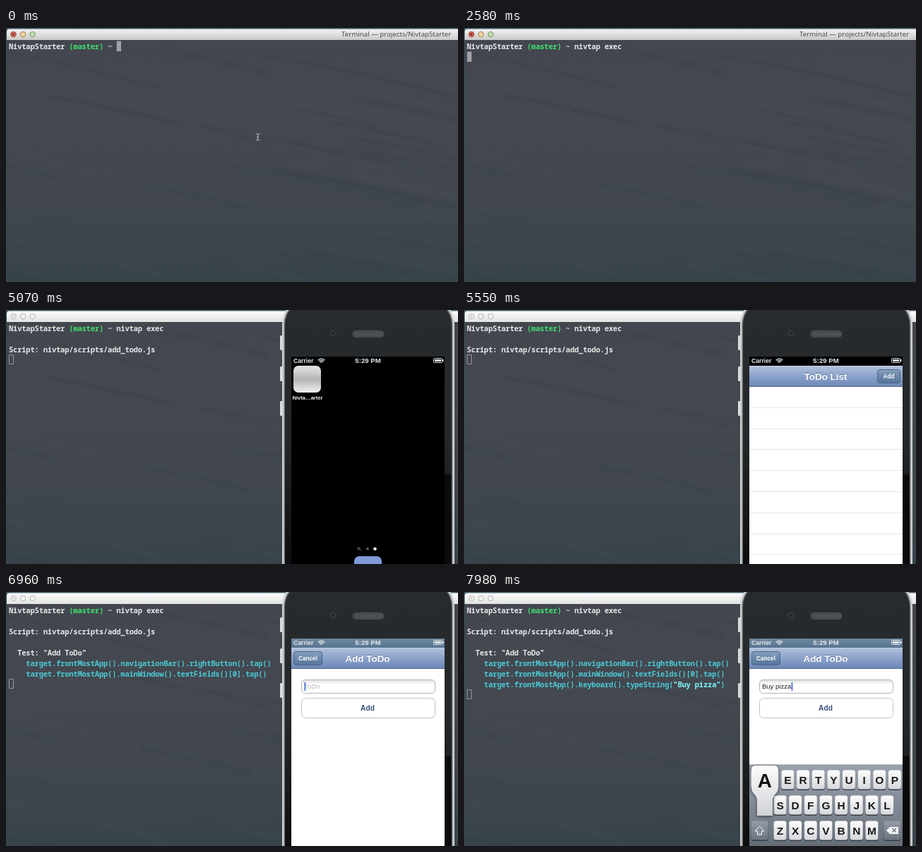
Recreate the animation shown at these times as an HTML page with a canvas. Size 640x360 px, loop 8000 ms.

```html
<!DOCTYPE html>
<html lang="en">
<head>
<meta charset="utf-8">
<title>Scripted phone test</title>
<style>
html, body { margin: 0; width: 100%; height: 100%; overflow: hidden; background: #42464d; }
canvas { display: block; width: 640px; height: 360px; }
</style>
</head>
<body>
<canvas id="stage" width="640" height="360"></canvas>
<script>
const c = document.getElementById('stage').getContext('2d');
const LOOP = 8000;
const SANS = '"Liberation Sans", Arial, sans-serif';
const MONO = '"Noto Sans Mono", "DejaVu Sans Mono", monospace';
const WHITE = '#e6e8e8', GREEN = '#42e070', CYAN = '#4cc9d4';
const COL = 6.09, ROW = 15;
const LEFT = 404, RIGHT = 621, TOP = 66, MID = 512, NAV = 79, BOTTOM = 391;

const PROJECT = 'NivtapStarter';
const COMMAND = 'nivtap exec';
const KEY_TIMES = [540, 780, 1050, 1200, 1320, 1440, 1590, 1740, 1890, 2040, 2190];
const TYPED = 'Buy pizza';
const TYPE_START = 7460, TYPE_STEP = 58;
const KEY_ROWS = ['QWERTYUIOP', 'ASDFGHJKL', 'ZXCVBNM'];

const at = {
  enter: 2520, script: 2790, phone: 3180, home: 3600, hideMouse: 4500,
  launch: 5070, launched: 5400, tint: 5600, tinted: 5800,
  test: 5910, tapAdd: 6090, tapField: 6390, slide: 6337, slid: 6697,
  focus: 6870, keys: 7060, keysUp: 7320, typeLine: 7320
};

const progress = (t, a, b) => Math.min(1, Math.max(0, (t - a) / (b - a)));
const ease = p => (1 - Math.cos(Math.PI * p)) / 2;

function text(s, x, y, font, color, align = 'left') {
  c.font = font;
  c.fillStyle = color;
  c.textAlign = align;
  c.fillText(s, x, y);
}

function gradient(y0, y1, ...colors) {
  const g = c.createLinearGradient(0, y0, 0, y1);
  colors.forEach((color, i) => g.addColorStop(i / (colors.length - 1), color));
  return g;
}

function rect(x, y, w, h, fill) {
  c.fillStyle = fill;
  c.fillRect(x, y, w, h);
}

function box(x, y, w, h, r, fill, stroke) {
  c.beginPath();
  c.roundRect(x, y, w, h, r);
  if (fill) { c.fillStyle = fill; c.fill(); }
  if (stroke) { c.strokeStyle = stroke; c.lineWidth = 1; c.stroke(); }
}

function dot(x, y, r, fill, stroke) {
  box(x - r, y - r, 2 * r, 2 * r, r, fill, stroke);
}

function poly(points, fill, stroke) {
  c.beginPath();
  points.forEach(([x, y]) => c.lineTo(x, y));
  c.closePath();
  c.fillStyle = fill;
  c.fill();
  if (stroke) { c.strokeStyle = stroke; c.lineWidth = 1; c.stroke(); }
}

// ---------- terminal ----------
function backdrop() {
  rect(0, 0, 640, 360, gradient(0, 360, '#43464e', '#444850', '#41474d', '#38444a'));
  let seed = 7;
  const rnd = () => (seed = seed * 16807 % 2147483647) / 2147483647;
  for (let i = 0; i < 40; i++) {
    const x = rnd() * 700 - 130, y = 20 + rnd() * 340, len = 120 + rnd() * 280;
    c.strokeStyle = i % 3 ? 'rgba(40,46,50,.07)' : 'rgba(90,94,108,.07)';
    c.lineWidth = 2 + rnd() * 8;
    c.beginPath();
    c.moveTo(x, y);
    c.quadraticCurveTo(x + len / 2, y + len * .08, x + len, y + len * .22);
    c.stroke();
  }
}

function titleBar(active) {
  rect(0, 0, 640, 3, '#48606a');
  rect(0, 0, 1, 360, '#2f4a55');
  box(1, 1.5, 660, 15.5, [4, 4, 0, 0],
    active ? gradient(2, 17, '#f1f1f1', '#c9c9c9') : gradient(2, 17, '#fbfbfb', '#e3e3e3'));
  const lights = active
    ? [['#e4705f', '#8d3a30'], ['#f3d3a0', '#a5804c'], ['#c4dfb4', '#739163']]
    : Array(3).fill(['#f3f3f3', '#b2b2b2']);
  lights.forEach(([fill, line], i) => dot(10.5 + 13.6 * i, 9, 3.7, fill, line));
  dot(10.5, 9, active ? 1.5 : 1, active ? '#65251e' : '#aaa');
  text(`Terminal — projects/${PROJECT}`, 475, 12.3, '9.7px "Noto Sans", "DejaVu Sans", sans-serif', active ? '#4a4a4a' : '#999');
}

function mono(s, col, row, color) {
  [...s].forEach((ch, i) =>
    text(ch, 4 + (col + i) * COL, 30 + ROW * row, `600 10.5px ${MONO}`, color));
}

function terminal(t) {
  const active = t < at.phone;
  backdrop();
  titleBar(active);
  const count = KEY_TIMES.filter(k => t >= k).length;
  mono(PROJECT, 0, 0, WHITE);
  mono('(master)', 14, 0, GREEN);
  mono('~ ' + COMMAND.slice(0, count), 23, 0, WHITE);

  let row = 0, col = 25 + count;
  if (t >= at.enter) { row = 1; col = 0; }
  const print = (time, r, ...parts) => {
    if (t < time) return;
    parts.forEach(([s, start, color]) => mono(s, start, r, color));
    row = r + 1;
  };
  print(at.script, 2, ['Script: nivtap/scripts/add_todo.js', 0, WHITE]);
  print(at.test, 4, ['Test: "Add ToDo"', 2, WHITE]);
  print(at.tapAdd, 5, ['target.frontMostApp().navigationBar().rightButton().tap()', 4, CYAN]);
  print(at.tapField, 6, ['target.frontMostApp().mainWindow().textFields()[0].tap()', 4, CYAN]);
  print(at.typeLine, 7,
    ['target.frontMostApp().keyboard().typeString(', 4, CYAN],
    [`"${TYPED}"`, 48, '#7ff6fb'],
    [')', 59, CYAN]);

  const x = 4.5 + col * COL, y = 18.5 + ROW * row;
  if (active) rect(x, y, 6.2, 14.5, '#a2a4a7');
  else box(4.5, y, 6, 13, 0, null, '#95989b');
}

// ---------- phone ----------
function phoneBody() {
  [36, 80, 129].forEach(y => box(388, y, 4, 21, 1.5, '#d9dbdc'));
  box(391, -18, 244, 460, 38, '#cfd1d2');
  box(393.5, -15.5, 239, 455, 36, '#6f7274');
  box(395, -14, 236, 452, 35, gradient(0, 360, '#282b2e', '#25282a', '#0c0d0e'));
  rect(RIGHT, 233, 9, 127, '#0b0b0c');
  dot(463, 33, 4.5, '#33373c');
  dot(463, 33, 2, '#20242c');
  box(491, 29.5, 44, 9, 4.5, '#3c3e41', '#56595b');
  for (let x = 494; x < 534; x += 2) rect(x, 31, 1, 6, '#606264');
}

function statusBar(tint) {
  rect(LEFT, TOP, 217, 13, '#000');
  c.save();
  c.globalAlpha *= tint;
  rect(LEFT, TOP, 217, 13, gradient(TOP, NAV, '#70899f', '#567390'));
  c.restore();
  const ink = '#e3e8ec';
  text('Carrier', 407, 74.9, `bold 8.7px ${SANS}`, ink);
  text('5:29 PM', MID + .5, 75, `bold 9.6px ${SANS}`, ink, 'center');
  c.strokeStyle = ink;
  c.lineWidth = 1.3;
  [2, 4.2, 6.4].forEach(r => {
    c.beginPath();
    c.arc(446.5, 75.5, r, -Math.PI * .77, -Math.PI * .23);
    c.stroke();
  });
  box(605.5, 68.5, 12, 6, 1, null, ink);
  rect(607, 70, 9, 3, ink);
  rect(618, 70, 1.5, 3, ink);
}

function homeScreen(showIcons) {
  rect(LEFT, TOP, 217, 326, '#000');
  if (!showIcons) return;
  box(407, 79, 39, 38, 7, gradient(79, 117, '#e2e2e2', '#cfcfcf', '#b4b4b4', '#d2d2d2', '#f0f0f0'));
  text('Nivta…arter', 427, 126.5, `bold 7.6px ${SANS}`, '#f0f0f0', 'center');
  dot(499.5, 338, 1.7, null, '#777');
  c.beginPath();
  c.moveTo(501, 339.5);
  c.lineTo(503, 341.5);
  c.stroke();
  dot(512, 338.5, 1.8, '#666');
  dot(522.5, 338.5, 2.2, '#fff');
  box(493, 349, 39, 38, 7, '#7f9bd8');
}

function navButton(label, x, w, y) {
  box(x + .5, y + 5.5, w, 19, 3.5, gradient(y + 5, y + 25, '#8ba2bd', '#6b88aa', '#557499'), '#48648a');
  text(label, x + w / 2 + .5, y + 18, `bold 8.2px ${SANS}`, '#fff', 'center');
}

function navBar(title, y) {
  rect(LEFT, y, 217, 30, gradient(y, y + 30, '#b3c3de', '#98accf', '#8099c4', '#6c86b5'));
  rect(LEFT, y, 217, 1, '#c3d0e2');
  rect(LEFT, y + 29, 217, 1, '#566b90');
  const font = `bold 13.4px ${SANS}`;
  text(title, MID, y + 18.6, font, '#5d7399', 'center');
  text(title, MID, y + 19.5, font, '#fff', 'center');
}

function listView() {
  rect(LEFT, NAV, 217, 312, '#fff');
  for (let y = 138.8; y < BOTTOM; y += 29.8) rect(LEFT, Math.round(y) - 1, 217, 1, '#e6e7e8');
  navBar('ToDo List', NAV);
  navButton('Add', 585, 32, NAV);
}

function addView(y, t) {
  rect(LEFT, y, 217, 330, '#fff');
  navBar('Add ToDo', y);
  navButton('Cancel', 407, 40, y);
  const fieldY = y + 45.5;
  box(418.5, fieldY, 189, 19, 5, gradient(fieldY, fieldY + 19, '#dcdcdc', '#fff', '#fff', '#fff'), '#b2b3b5');
  box(418.5, y + 71.5, 189, 28, 6, '#fff', '#c0c1c3');
  text('Add', MID, y + 89, `bold 10.2px ${SANS}`, '#3b4f7a', 'center');

  const value = TYPED.slice(0, Math.max(0, Math.floor((t - TYPE_START) / TYPE_STEP) + 1));
  text(value || 'ToDo', 422, y + 58.3, `9.5px ${SANS}`, value ? '#222' : '#b6b6b6');
  if (t >= at.focus) rect(422.5 + c.measureText(value).width, y + 49, 1.6, 12, '#4268cf');
  return value;
}

function keyCap(x, y, w, dark) {
  box(x - w / 2, y - 12, w, 27, 3.5, '#363b43');
  box(x - w / 2, y - 13.5, w, 27, 3.5, dark
    ? gradient(y - 13, y + 13, '#949ba6', '#6c7480')
    : gradient(y - 13, y + 13, '#fdfdfd', '#e9eaec', '#d6d8dc'));
}

function popup(x, y, letter) {
  c.save();
  c.shadowColor = 'rgba(20,24,30,.7)';
  c.shadowBlur = 4;
  c.shadowOffsetY = 1;
  c.beginPath();
  c.moveTo(x - 19, y - 50);
  c.quadraticCurveTo(x - 19, y - 56, x - 13, y - 56);
  c.lineTo(x + 13, y - 56);
  c.quadraticCurveTo(x + 19, y - 56, x + 19, y - 50);
  c.lineTo(x + 19, y - 25);
  c.bezierCurveTo(x + 19, y - 15, x + 11, y - 16, x + 11, y - 6);
  c.lineTo(x + 11, y + 15);
  c.lineTo(x - 11, y + 15);
  c.lineTo(x - 11, y - 6);
  c.bezierCurveTo(x - 11, y - 16, x - 19, y - 15, x - 19, y - 25);
  c.closePath();
  c.fillStyle = gradient(y - 56, y + 15, '#fbfbfb', '#e6e7e9', '#d0d2d6');
  c.fill();
  c.restore();
  text(letter, x, y - 25.5, `bold 28px ${SANS}`, '#111', 'center');
}

function keyboard(top, pressed) {
  rect(LEFT, top, 217, 147, gradient(top, top + 147, '#9aa2ae', '#7b838f', '#525a66'));
  rect(LEFT, top, 217, 1, '#c1c7cf');
  let hit;
  KEY_ROWS.forEach((keys, r) => [...keys].forEach((k, i) => {
    const x = MID + .5 + (i - (keys.length - 1) / 2) * 21.65, y = top + 22 + 36 * r;
    keyCap(x, y, 18, false);
    text(k, x, y + 5.5, `bold 15.5px ${SANS}`, '#1a1a1a', 'center');
    if (k === pressed) hit = [x, y, k];
  }));
  const y = top + 94;
  keyCap(418.5, y, 24, true);
  keyCap(606.5, y, 24, true);
  poly([[418.5, y - 6], [425, y + 1], [421.5, y + 1], [421.5, y + 6], [415.5, y + 6], [415.5, y + 1], [412, y + 1]],
    '#858d98', '#fff');
  poly([[598, y], [603, y - 5], [615, y - 5], [615, y + 5], [603, y + 5]], '#f4f5f6');
  text('×', 609, y + 4.2, `bold 13px ${SANS}`, '#6c7480', 'center');
  if (hit) popup(...hit);
}

function phone(t) {
  phoneBody();
  c.save();
  c.beginPath();
  c.rect(LEFT, TOP, 217, 326);
  c.clip();
  homeScreen(t >= at.home);
  if (t >= at.launch) {
    const p = ease(progress(t, at.launch, at.launched));
    c.save();
    c.globalAlpha = Math.min(1, p * 2);
    c.translate(MID, 229);
    c.scale(.1 + .9 * p, .1 + .9 * p);
    c.translate(-MID, -229);
    listView();
    c.restore();
  }
  if (t >= at.slide) {
    const y = BOTTOM - (BOTTOM - NAV) * ease(progress(t, at.slide, at.slid));
    const value = addView(y, t);
    if (t >= at.keys)
      keyboard(BOTTOM - 147 * ease(progress(t, at.keys, at.keysUp)), value.slice(-1).toUpperCase());
  }
  if (t >= at.home) statusBar(progress(t, at.tint, at.tinted));
  c.restore();
}

// ---------- pointers ----------
function beam(x, y) {
  c.strokeStyle = '#b4b7b9';
  c.lineWidth = 1;
  c.beginPath();
  [-1, 1].forEach(s => {
    c.moveTo(x - 3, y + 5 * s);
    c.quadraticCurveTo(x, y + 5 * s, x, y + 2 * s);
    c.quadraticCurveTo(x, y + 5 * s, x + 3, y + 5 * s);
  });
  c.moveTo(x, y - 4);
  c.lineTo(x, y + 4);
  c.moveTo(x - 1.5, y);
  c.lineTo(x + 1.5, y);
  c.stroke();
}

function arrow(x, y) {
  poly([[0, 0], [0, 9], [2, 7], [3.4, 10.3], [5, 9.6], [3.6, 6.4], [6.3, 6.3]].map(([a, b]) => [x + a, y + b]),
    '#111', '#f2f2f2');
}

function draw(t) {
  terminal(t);
  if (t < KEY_TIMES[0]) beam(356.5, 154.5);
  if (t >= at.phone) {
    phone(t);
    if (t < at.hideMouse) arrow(357, 153.5);
  }
}

const start = performance.now();
function frame() {
  draw((performance.now() - start) % LOOP);
  requestAnimationFrame(frame);
}
frame();
</script>
</body>
</html>
```
